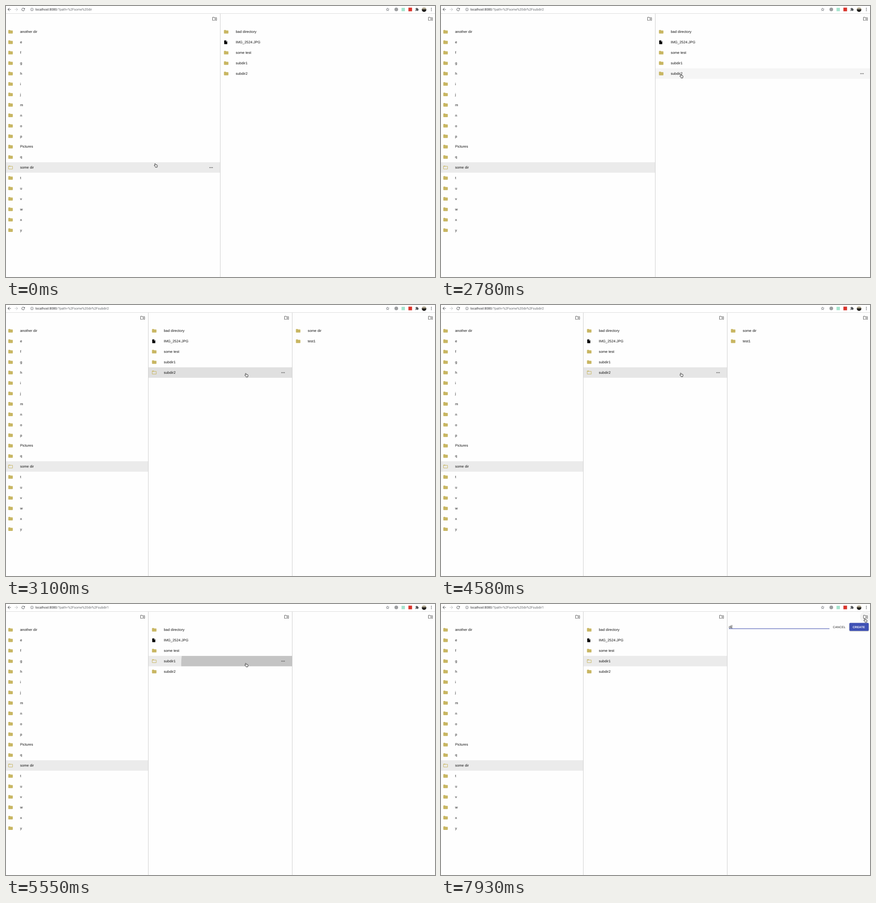
These frames come from a looping animation (942x595 px, 7.99 s). An HTML page with a canvas:

```html
<!DOCTYPE html>
<html lang="en">
<head>
<meta charset="utf-8">
<title>File browser</title>
<style>
  html, body { margin: 0; width: 100%; height: 100%; overflow: hidden; background: #fefefe; }
  canvas { display: block; width: 942px; height: 595px; }
</style>
</head>
<body>
<canvas id="stage"></canvas>
<script>
const W = 942, H = 595, LOOP = 7990;
const ROW = 22.92, FIRST = 56.6;
const SANS = '"Liberation Sans", Arial, sans-serif';
const BAR = 'Roboto, sans-serif';
const GOLD = '#c8b662', GREY = '#5f6368', BLUE = '#3f51b5';

const canvas = document.getElementById('stage');
const ctx = canvas.getContext('2d');
const ratio = window.devicePixelRatio || 1;
canvas.width = W * ratio;
canvas.height = H * ratio;

// Icons live in a 24 unit box
const tab = 'M10 4H4Q2 4 2 6V18Q2 20 4 20H20Q22 20 22 18V8Q22 6 20 6H12Z';
const icons = {
  folder: new Path2D(tab),
  open: new Path2D(tab + 'M4 8H20V18H4Z'),
  add: new Path2D(tab + 'M4 6H9.2L11.2 8H20V18H4ZM12 12H14V10H16V12H18V14H16V16H14V14H12Z'),
  file: new Path2D('M6 2Q4 2 4 4V20Q4 22 6 22H18Q20 22 20 20V8L14 2ZM13 9V3.5L18.5 9Z'),
  arrow: new Path2D('M20 11H7.8L13.4 5.4 12 4 4 12 12 20 13.4 18.6 7.8 13H20Z'),
  puzzle: new Path2D('M20.5 11H19V7Q19 5 17 5H13V3.5A2.5 2.5 0 0 0 8 3.5V5H4Q2 5 2 7V10.8H3.5A2.7 2.7 0 0 1 3.5 16.2H2V20Q2 22 4 22H7.8V20.5A2.7 2.7 0 0 1 13.2 20.5V22H17Q19 22 19 20V16H20.5A2.5 2.5 0 0 0 20.5 11Z')
};
const hand = new Path2D('M-2.6-3.4Q-1.7-4.8-.8-3.5L-.1-1.7 2.5-1.1Q3.8-.7 3.7.8 3.6 2.2 2.9 3V4.1H-.9L-1.2 3Q-3.5 1-3.7 0-3.3-.9-1.7.2Z');
const knuckles = new Path2D('M.3 1.2V2.8M1.5 1.2V2.8M.3-1.5V-.2M1.6-1.2V-.1');

const root = ['another dir', ...'efghijmnop', 'Pictures', 'q', 'some dir', ...'tuvwxy'];
const middle = ['bad directory', 'IMG_2524.JPG', 'some test', 'subdir1', 'subdir2'];
const inner = ['some dir', 'test1'];

// Cursor journeys: start, end, number of steps, target x and y
const START = [329, 350];
const moves = [
  [500, 501, 1, 329.8, 350.3],
  [650, 1230, 9, 528, 154],
  [4580, 5100, 9, 528, 134],
  [5730, 6090, 6, 930, 45],
  [6210, 6490, 6, 932, 36]
];

const clamp = v => Math.max(0, Math.min(1, v));
const smooth = v => v * v * (3 - 2 * v);
const rowY = i => FIRST + i * ROW;

function stepped(t, from, to, n) {
  if (t < from) return 0;
  if (n === 1) return 1;
  return clamp((Math.floor((t - from) / (to - from) * (n - 1) + 1e-6) + 1) / n);
}

function cursorAt(t) {
  let [x, y] = START;
  for (const [from, to, n, tx, ty] of moves) {
    const p = smooth(stepped(t, from, to, n));
    x += (tx - x) * p;
    y += (ty - y) * p;
  }
  return { x, y, tipX: x - 1.5, tipY: y - 4 };
}

function rect(x, y, w, h, color) {
  ctx.fillStyle = color;
  ctx.fillRect(x, y, w, h);
}

function disc(x, y, r, color) {
  ctx.fillStyle = color;
  ctx.beginPath();
  ctx.arc(x, y, r, 0, Math.PI * 2);
  ctx.fill();
}

function icon(name, x, y, scale, color, flip = 1) {
  ctx.save();
  ctx.translate(x, y);
  ctx.scale(scale * flip, scale);
  ctx.translate(-12, -12);
  ctx.fillStyle = color;
  ctx.fill(icons[name], 'evenodd');
  ctx.restore();
}

function text(str, x, y, font, color, spacing = 0) {
  ctx.font = font;
  ctx.letterSpacing = spacing + 'px';
  ctx.fillStyle = color;
  ctx.fillText(str, x, y);
  return ctx.measureText(str).width;
}

const label = (str, x, y) => text(str, x, y, '7.8px ' + SANS, '#101010', 0.03);

function star(x, y, r) {
  ctx.beginPath();
  for (let i = 0; i < 10; i++) {
    const a = i * Math.PI / 5 - Math.PI / 2, d = i % 2 ? r * 0.45 : r;
    ctx.lineTo(x + d * Math.cos(a), y + d * Math.sin(a));
  }
  ctx.closePath();
  ctx.stroke();
}

function toolbar(t) {
  rect(0, 0, W, 16, '#fff');
  rect(0, 16, W, 1, '#dcdcdc');
  icon('arrow', 7.3, 7.6, 0.46, '#505357');
  icon('arrow', 22.6, 7.6, 0.46, '#c0c2c4', -1);

  ctx.strokeStyle = '#505357';
  ctx.lineWidth = 1;
  ctx.beginPath();
  ctx.arc(37.8, 7.6, 3.1, 0.3, 5.3);
  ctx.stroke();
  ctx.fillStyle = '#505357';
  ctx.beginPath();
  ctx.moveTo(41.4, 3.9);
  ctx.lineTo(41.4, 7.2);
  ctx.lineTo(38.1, 7.2);
  ctx.fill();

  ctx.strokeStyle = GREY;
  ctx.lineWidth = 0.75;
  ctx.beginPath();
  ctx.arc(57, 7.6, 3, 0, Math.PI * 2);
  ctx.stroke();
  rect(56.6, 5.8, 0.8, 0.8, GREY);
  rect(56.6, 7.2, 0.8, 2.2, GREY);

  const sub = t < 2780 ? '' : t < 5340 ? '%2Fsubdir2' : '%2Fsubdir1';
  const font = '7.17px ' + BAR;
  const host = text('localhost:8080', 64.5, 10.1, font, '#2c2d30');
  text('/?path=%2Fsome%20dir' + sub, 64.5 + host, 10.1, font, '#66696d');

  ctx.lineWidth = 0.75;
  star(838, 7.8, 3.4);
  disc(857, 7.6, 4, '#9c9ea0');
  rect(868.5, 4, 7.4, 7.4, '#a5e3cd');
  rect(883.6, 3.6, 8, 8, '#d8342b');
  icon('puzzle', 902.6, 7.6, 0.34, '#505357');
  const sky = ctx.createLinearGradient(0, 3, 0, 13);
  sky.addColorStop(0, '#d9d2bd');
  sky.addColorStop(0.4, '#8c8470');
  sky.addColorStop(0.5, '#25231f');
  sky.addColorStop(1, '#1c1b19');
  disc(918, 7.8, 5.1, sky);
  for (const dy of [-2.7, 0, 2.7]) disc(934, 7.6 + dy, 0.85, '#505357');
}

// Click waves: origin x, full radius, column bounds, row, size and strength at t
function waveAt(t) {
  if (t >= 2840 && t < 4900) {
    const alpha = t < 2960 ? 0.15 : t < 3100 ? 0.1 : t < 3330 ? 0.048 : 0.02;
    return { x: 369, r: 415 * smooth(clamp((t - 2740) / 330)), row: 4, alpha };
  }
  if (t >= 5340 && t < 5910) {
    const step = t < 5400 ? 0.1 : t < 5480 ? 0.25 : t < 5550 ? 0.45 : t < 5670 ? 0.66 : 1;
    const alpha = t < 5550 ? 0.1 + step * 0.1 : t < 5670 ? 0.166 : 0.13 * clamp((5910 - t) / 240);
    return { x: 528, r: 217 * step, row: 3, alpha };
  }
  return null;
}

function drawWave(wave, left, right) {
  const y = rowY(wave.row);
  ctx.save();
  ctx.beginPath();
  ctx.rect(left, y - ROW / 2, right - left, ROW);
  ctx.clip();
  disc(wave.x, y + 6, wave.r, `rgba(0,0,0,${wave.alpha})`);
  ctx.restore();
}

function column(items, left, right, selected, cursor, wave) {
  const base = left || -3.5, edge = right === W ? W + 2 : right;
  const start = left ? left + 1 : 0;
  const over = cursor.tipX >= start && cursor.tipX < right
    ? Math.floor((cursor.tipY - FIRST) / ROW + 0.5) : -1;

  items.forEach((name, i) => {
    const y = rowY(i), on = name === selected;
    if (on || i === over) rect(start, y - ROW / 2, right - start, ROW, on ? '#ebebeb' : '#f5f5f5');
    if (wave && wave.row === i) drawWave(wave, start, right);
    if (name.endsWith('.JPG')) icon('file', base + 12.5, y + 0.1, 0.42, '#000');
    else icon(on ? 'open' : 'folder', base + 13.5, y, 0.49, GOLD);
    label(name, base + 34.5, y + 2.7);
    if (i === over) for (const dx of [-2.9, 0, 2.9]) disc(edge - 19.6 + dx, y + 0.2, 0.95, '#555');
  });
  if (right < W) rect(right, 17, 1, H, '#cfcfcf');
  icon('add', edge - 12, 28.2, 0.49, '#5c5c5c');
}

function form(t) {
  const grow = stepped(t, 6730, 6910, 4);
  rect(632, 54, 221, 0.5, '#949494');
  rect(742.5 - 110.5 * grow, 53.7, 221 * grow, 1, BLUE);

  const typed = 'di'.slice(0, t < 7870 ? 0 : t < 7930 ? 1 : 2);
  const width = typed ? label(typed, 632, 52.7) : 0;
  if (t < 7210 || t >= 7690) rect(632 + width + (typed ? 0.3 : 0), 46, 0.8, 8, '#222');

  text('CANCEL', 860.6, 52.5, '6.6px ' + SANS, '#222', 0.15);
  ctx.save();
  ctx.shadowColor = 'rgba(0,0,0,.35)';
  ctx.shadowBlur = 2 * ratio;
  ctx.shadowOffsetY = 0.8 * ratio;
  ctx.fillStyle = BLUE;
  ctx.beginPath();
  ctx.roundRect(896.7, 41.6, 42.5, 17.3, 2);
  ctx.fill();
  ctx.restore();
  text('CREATE', 904, 52.5, 'bold 6.5px ' + SANS, '#fff', 0.12);
}

function drawCursor({ x, y }) {
  ctx.save();
  ctx.translate(x, y);
  ctx.fillStyle = '#fff';
  ctx.strokeStyle = '#222';
  ctx.lineWidth = 0.9;
  ctx.lineJoin = 'round';
  ctx.fill(hand);
  ctx.stroke(hand);
  ctx.lineWidth = 0.4;
  ctx.stroke(knuckles);
  ctx.restore();
}

function draw(t) {
  ctx.setTransform(ratio, 0, 0, ratio, 0, 0);
  ctx.textRendering = 'geometricPrecision';
  rect(0, 0, W, H, '#fefefe');
  toolbar(t);

  const cursor = cursorAt(t);
  if (Math.hypot(cursor.tipX - 932, cursor.tipY - 28) < 9) {
    disc(932, 28.2, 11.8, t >= 6730 && t < 6910 ? '#dedede' : '#f5f5f5');
  }
  if (t < 2840) {
    column(root, 0, 470, 'some dir', cursor);
    column(middle, 470, W, '', cursor);
  } else {
    const clicked = t >= 5340;
    column(root, 0, 312, 'some dir', cursor);
    column(middle, 312, 628, clicked ? 'subdir1' : 'subdir2', cursor, waveAt(t));
    column(clicked ? [] : inner, 628, W, '', cursor);
  }
  if (t >= 6730) form(t);
  drawCursor(cursor);
}

const begin = performance.now();
function tick() {
  draw((performance.now() - begin) % LOOP);
  requestAnimationFrame(tick);
}
tick();
</script>
</body>
</html>
```
